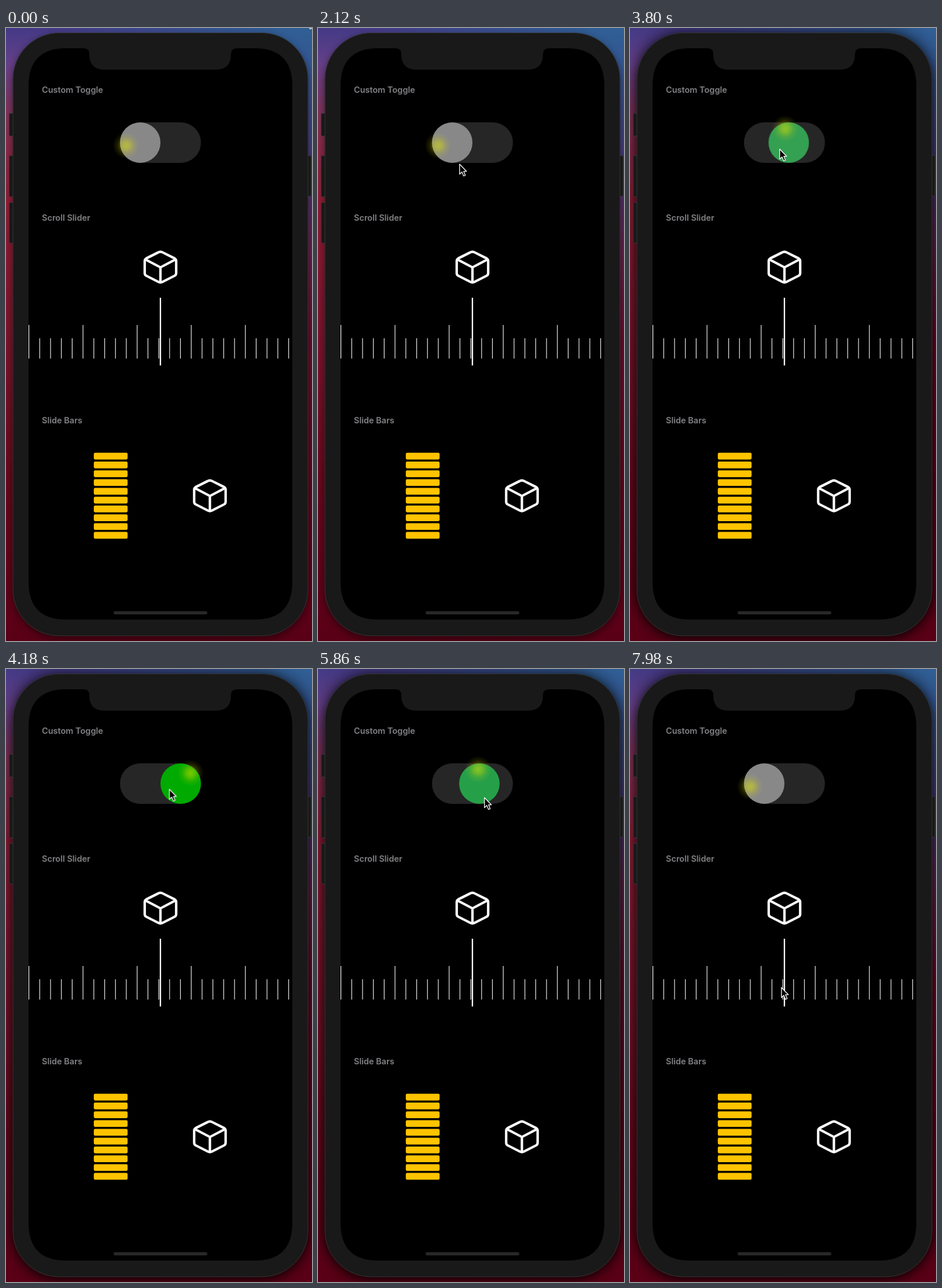
Recreate the animation shown at these times as an HTML page. Size 529 by 1059 pixels, loop 8 s.

```html
<!DOCTYPE html>
<html lang="en">
<head>
<meta charset="utf-8">
<title>Custom controls</title>
<style>
  html, body { margin: 0; width: 100%; height: 100%; overflow: hidden; background: #000; }
  svg { display: block; width: 529px; height: 1059px; }
  text { font: 600 14.5px Inter, sans-serif; fill: #828286; }

  .knob, .disc, .glow, .dim, .cursor { animation: 8s infinite; }
  .knob { animation-name: slide; }
  .disc { animation-name: tint; fill: #888889; }
  .glow { animation-name: orbit; }
  .dim { animation-name: dim; animation-timing-function: step-end; }
  .cursor { animation-name: point; }
  .knob, .disc, .glow { animation-timing-function: ease-in-out; }

  @keyframes slide {
    0%, 44%, 77.025%, 100% { transform: translate(232px, 198px); }
    50.25%, 70.775% { transform: translate(302px, 198px); }
  }
  @keyframes tint {
    0%, 44%, 77.025%, 100% { fill: #888889; }
    47.5% { fill: #34a053; animation-timing-function: ease-out; }
    50.25%, 70.775% { fill: #00aa00; }
    73.25% { fill: #25a048; animation-timing-function: ease-out; }
  }
  @keyframes orbit {
    0%, 44%, 77.025%, 100% { transform: rotate(168deg); }
    50.25%, 70.775% { transform: rotate(313deg); }
  }
  @keyframes dim {
    0% { opacity: 0; }
    36%, 100% { opacity: .7; }
  }
  @keyframes point {
    0% { transform: translate(518px, -20px); animation-timing-function: ease-in; }
    9% { transform: translate(400px, 82px); animation-timing-function: linear; }
    17% { transform: translate(268px, 212px); animation-timing-function: ease-out; }
    24%, 27.5% { transform: translate(244px, 234px); }
    36% { transform: translate(252px, 214px); }
    42%, 48.5% { transform: translate(258px, 208px); }
    57%, 62% { transform: translate(290px, 206px); }
    68%, 73.5% { transform: translate(287px, 221px); animation-timing-function: ease-in; }
    78% { transform: translate(322px, 400px); animation-timing-function: ease-out; }
    83%, 84.5% { transform: translate(342px, 527px); }
    95%, 100% { transform: translate(261px, 549px); }
  }
</style>
</head>
<body>
<svg viewBox="0 0 529 1059" xmlns="http://www.w3.org/2000/svg">
  <defs>
    <linearGradient id="left" x2="0" y2="1">
      <stop stop-color="#443a86"/>
      <stop offset=".06" stop-color="#654088"/>
      <stop offset=".15" stop-color="#833052"/>
      <stop offset=".28" stop-color="#8e1c34"/>
      <stop offset=".5" stop-color="#7a142c"/>
      <stop offset=".75" stop-color="#66081c"/>
      <stop offset="1" stop-color="#5a0016"/>
    </linearGradient>
    <linearGradient id="right" x2="0" y2="1">
      <stop stop-color="#305f96"/>
      <stop offset=".1" stop-color="#364f8c"/>
      <stop offset=".24" stop-color="#4b3376"/>
      <stop offset=".36" stop-color="#66204a"/>
      <stop offset=".5" stop-color="#6c0a2c"/>
      <stop offset=".75" stop-color="#62041c"/>
      <stop offset="1" stop-color="#5a0016"/>
    </linearGradient>
    <linearGradient id="fade">
      <stop offset=".15" stop-color="#fff"/>
      <stop offset=".9" stop-color="#000"/>
    </linearGradient>
    <mask id="blend"><rect width="529" height="1059" fill="url(#fade)"/></mask>
    <radialGradient id="light">
      <stop stop-color="#e1e600" stop-opacity=".52"/>
      <stop offset=".3" stop-color="#dce000" stop-opacity=".41"/>
      <stop offset=".65" stop-color="#d8d800" stop-opacity=".14"/>
      <stop offset="1" stop-color="#d8d800" stop-opacity="0"/>
    </radialGradient>
    <filter id="soft" x="-10%" y="-10%" width="120%" height="120%">
      <feGaussianBlur stdDeviation="7"/>
    </filter>
    <filter id="wide" x="-15%" y="-10%" width="130%" height="120%">
      <feGaussianBlur stdDeviation="15"/>
    </filter>
    <g id="cube" fill="none" stroke="#fff" stroke-width="4.2" stroke-linejoin="round">
      <path d="M-3.5-25.5Q0-27.3 3.5-25.5L24.5-15Q27.2-13.5 27.2-10.5V10.5Q27.2 13.5 24.5 15L3.5 25.7Q0 27.4-3.5 25.7L-24.5 15Q-27.2 13.5-27.2 10.5V-10.5Q-27.2-13.5-24.5-15Z"/>
      <path d="M-26-13.2L0 .5L26-13.2M0 .5V26"/>
    </g>
  </defs>

  <rect width="529" height="1059" fill="url(#right)"/>
  <rect width="529" height="1059" fill="url(#left)" mask="url(#blend)"/>
  <rect x="12" y="13" width="510" height="1042" rx="80" opacity=".5" filter="url(#soft)"/>
  <g class="dim"><rect x="12" y="8" width="510" height="1042" rx="80" filter="url(#wide)"/></g>

  <g fill="#191919" stroke="#343536">
    <rect x="5.5" y="147.5" width="10" height="39" rx="2"/>
    <rect x="5.5" y="220.5" width="10" height="71" rx="2"/>
    <rect x="5.5" y="301.5" width="10" height="70" rx="2"/>
    <rect x="517.5" y="220.5" width="10" height="70" rx="2"/>
    <rect x="12" y="8.5" width="510" height="1041.5" rx="80"/>
  </g>
  <path d="M104 35H134Q144 35 144 45Q144 72 170 72H363Q389 72 389 45Q389 35 399 35H430Q495 35 495 100V957Q495 1022 430 1022H104Q39 1022 39 957V100Q39 35 104 35Z"/>
  <rect x="186" y="1007.5" width="162" height="5.5" rx="2.75" fill="#282828"/>

  <text x="62" y="112">Custom Toggle</text>
  <text x="62" y="333">Scroll Slider</text>
  <text x="62" y="683">Slide Bars</text>

  <rect x="197" y="163" width="140" height="70" rx="35" fill="#262626"/>
  <g class="knob">
    <circle class="disc" r="35"/>
    <g class="glow"><circle cx="25" r="23" fill="url(#light)"/></g>
  </g>

  <use href="#cube" x="267" y="413"/>
  <use href="#cube" x="352.500" y="808"/>
  <g id="ruler" fill="#f0f0f0"></g>
  <rect x="265.800" y="466" width="2.300" height="117" fill="#fff"/>
  <g id="bars" fill="#ffc300"></g>

  <path class="cursor" d="M.8 1.200V18.500L4.800 14.800L7.800 21.700L10.700 20.500L7.900 13.700H12.800Z" stroke="#fff" stroke-width="1.300" stroke-linejoin="round"/>
</svg>
<script>
  const addRect = (id, attrs) => {
    const rect = document.createElementNS('http://www.w3.org/2000/svg', 'rect');
    for (const key in attrs) rect.setAttribute(key, attrs[key]);
    document.getElementById(id).append(rect);
  };

  for (let i = 0; i < 25; i++) {
    const y = i % 5 ? 536 : 513;
    addRect('ruler', { x: 39 + i * 18.71, y, width: 1.17, height: 571 - y });
  }
  for (let i = 0; i < 10; i++) {
    addRect('bars', { x: 151.8, y: 733.8 + i * 15.2, width: 58.4, height: 11.7, rx: 2.4 });
  }
</script>
</body>
</html>
```
